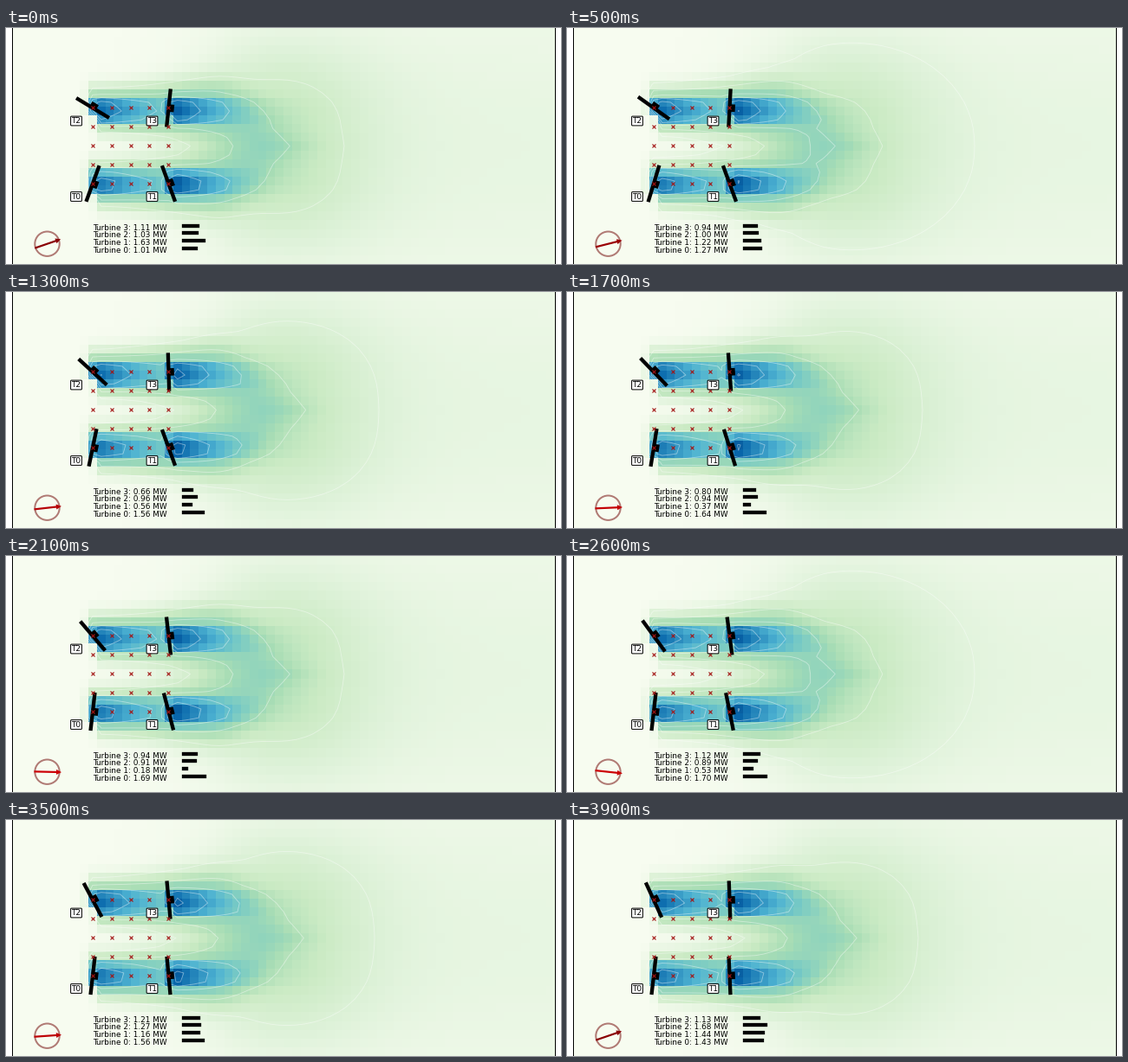
These frames come from a looping animation (640x273 px, 4000 ms). A matplotlib script:

```python
import numpy as np
import matplotlib.pyplot as plt
from matplotlib.animation import FuncAnimation
from matplotlib.patches import Circle, Polygon

W, H, DPI = 640, 273, 100
LEFT, RIGHT = 7, 633
COLS, ROWS = 64, 27
FRAMES, INTERVAL = 40, 100
PX = 72 / DPI  # points per pixel
FONT = 6.4


def path(*points):
    """Straight-line motion through (step, value) key points."""
    steps, values = zip(*points)
    return lambda i: float(np.interp(i, steps, values))


class Turbine:
    def __init__(self, x, y, wake_y, deficit, tilt, power):
        self.x, self.y = x, y
        self.wake_y, self.deficit = wake_y, deficit
        self.tilt, self.power = tilt, power


TURBINES = [
    Turbine(100, 180, 180, 0.36,
            tilt=path((0, -20), (21, -6.5)),
            power=lambda i: 1.70 - 0.69 * ((i - 24) / 24) ** 2),
    Turbine(187.5, 180, 180, 0.42,
            tilt=path((0, 20), (13, 20), (39, 2.5)),
            power=path((0, 1.63), (13, 0.56), (21, 0.18), (39, 1.44))),
    Turbine(100, 92.5, 95.5, 0.41,
            tilt=lambda i: 58.8 - 0.88 * i,
            power=path((0, 1.03), (31, 0.86), (39, 1.68))),
    Turbine(187.5, 92.5, 95.5, 0.41,
            tilt=path((0, -6), (21, 6.5), (31, 8.5), (39, 2)),
            power=path((0, 1.11), (13, 0.66), (31, 1.30), (39, 1.13))),
]
wind = path((0, 19), (31, -11), (39, 19))


def sigmoid(v):
    return 1 / (1 + np.exp(-v))


xs = LEFT + (np.arange(COLS) + 0.5) * (RIGHT - LEFT) / COLS
ys = (np.arange(ROWS) + 0.5) * H / ROWS
X, Y = np.meshgrid(xs, ys)


def onset(x0, dy, edge, ahead=0):
    """Stepped upstream edge: weak columns before the full wake."""
    start = x0 + 10 * (dy > 9)
    first = np.where(X < x0 + 10, edge, 1)
    return np.where(X > start, first, np.where(X > start - 10, ahead, 0))


def wake_field():
    # Pale air and the wide plume far downstream
    dy = np.abs(Y - 137)
    field = 0.085 * sigmoid((X - 240) / 40) * np.exp(-(dy / 200) ** 2)
    field += (0.25 * sigmoid((X - 255) / 25) * sigmoid((390 - X) / 38)
              * np.exp(-(dy / 112) ** 3))

    # Two rows of wake that widen and merge into a wedge
    width = 27 + 23 * (np.clip(X - 95, 0, None) / 205) ** 1.6
    mask = 0
    for yc in (94.5, 181):
        d = Y - yc
        mask = mask + np.exp(-np.abs(d / width) ** 3) * onset(95, d, 1, 0.15)
    mask = np.clip(mask, 0, 1) * sigmoid((335 - 0.95 * dy - X) / 14)
    field += (0.45 - field) * mask

    # Dark core behind each rotor
    for t in TURBINES:
        d = Y - t.wake_y
        x0 = t.x - 4.8
        fade = np.exp(-(np.clip(X - x0 - 10, 0, None) / 55) ** 1.4)
        field += (t.deficit * fade * np.exp(-(d / 15) ** 4)
                  * onset(x0, d, 0.65))
    return field


FIELD = wake_field()


def contour_levels(i):
    """The two outer contours shrink slowly, then spring back."""
    phase = (i - 1) % 21 / 21
    mid = FIELD[ROWS // 2]
    low, high = np.interp([490 - 105 * phase, 373 - 48 * phase], xs, mid)
    return np.arange(low, 0.95, max(high - low, 0.08))


fig = plt.figure(figsize=(W / DPI, H / DPI), dpi=DPI, facecolor="white")
ax = fig.add_axes([0, 0, 1, 1])
ax.axis("off")
ax.imshow(FIELD, cmap="GnBu", vmin=0, vmax=1, interpolation="nearest",
          extent=[LEFT, RIGHT, H, 0], aspect="auto", zorder=0)
ax.set_xlim(0, W)
ax.set_ylim(H, 0)
ax.set_autoscale_on(False)


def stroke(width, cap="butt", **kw):
    return ax.plot([], [], lw=width * PX, solid_capstyle=cap, **kw)[0]


for x in (LEFT, RIGHT):
    ax.plot([x, x], [-5, H + 5], color="black", lw=PX, zorder=8)

for k, t in enumerate(TURBINES):
    row = 3 - k
    t.rotor = stroke(4.3, "projecting", color="black", zorder=4)
    t.nacelle = stroke(8.6, color="black", zorder=4)
    t.bar = stroke(4.3, "projecting", color="black", zorder=4)
    t.bar_y = 228.7 + 8.67 * row
    t.label = ax.text(100.5, 233.6 + 8.67 * row, "", fontsize=FONT,
                      va="baseline", zorder=6)
    ax.text(t.x - 19, t.y + 15, f"T{k}", fontsize=FONT, ha="center",
            va="center", zorder=6,
            bbox=dict(boxstyle="round,pad=0.1", fc="white", ec="black", lw=PX))

gx, gy = np.meshgrid(np.linspace(100, 187.2, 5), np.linspace(92.2, 180.2, 5))
ax.plot(gx.ravel(), gy.ravel(), "x", color="#a31515", ms=4.2 * PX,
        mew=1.1 * PX, zorder=5)

CENTER = np.array([47.5, 249.7])
ax.add_patch(Circle(CENTER, 14.2, fill=False, ec="#b07a74", lw=2 * PX,
                    zorder=4))
shaft = stroke(2.2, zorder=5)
head = ax.add_patch(Polygon(np.zeros((3, 2)), lw=0, zorder=5))

contours = []


def draw_contours(i):
    while contours:
        contours.pop().remove()
    contours.append(ax.contour(X, Y, FIELD, levels=contour_levels(i),
                               colors="white", alpha=0.42,
                               linewidths=0.9 * PX, zorder=2))


def draw_turbine(k, t, i):
    a = np.radians(t.tilt(i))
    s, c = np.sin(a), np.cos(a)
    r = 20
    t.rotor.set_data([t.x - r * s, t.x + r * s], [t.y - r * c, t.y + r * c])
    t.nacelle.set_data([t.x, t.x + 6.3 * c], [t.y, t.y - 6.3 * s])
    p = t.power(i)
    t.bar.set_data([205, 205 + 14.3 * p], [t.bar_y, t.bar_y])
    t.label.set_text(f"Turbine {k}: {p:.2f} MW")


def draw_compass(i):
    a = np.radians(wind(i))
    along = np.array([np.cos(a), -np.sin(a)])
    side = np.array([np.sin(a), np.cos(a)])
    # The arrow darkens as the wind turns upward
    color = (np.interp(wind(i), [0, 19], [0.8, 0.54]), 0, 0.02)
    ends = np.array([CENTER - 15 * along, CENTER + 12 * along])
    shaft.set_data(ends[:, 0], ends[:, 1])
    shaft.set_color(color)
    base = CENTER + 10.5 * along
    head.set_xy([CENTER + 16.5 * along, base + 3 * side, base - 3 * side])
    head.set_facecolor(color)


def update(i):
    draw_contours(i)
    for k, t in enumerate(TURBINES):
        draw_turbine(k, t, i)
    draw_compass(i)
    return []


anim = FuncAnimation(fig, update, frames=FRAMES, interval=INTERVAL,
                     init_func=lambda: update(0), repeat=True, repeat_delay=0,
                     blit=False)
plt.show()
```
